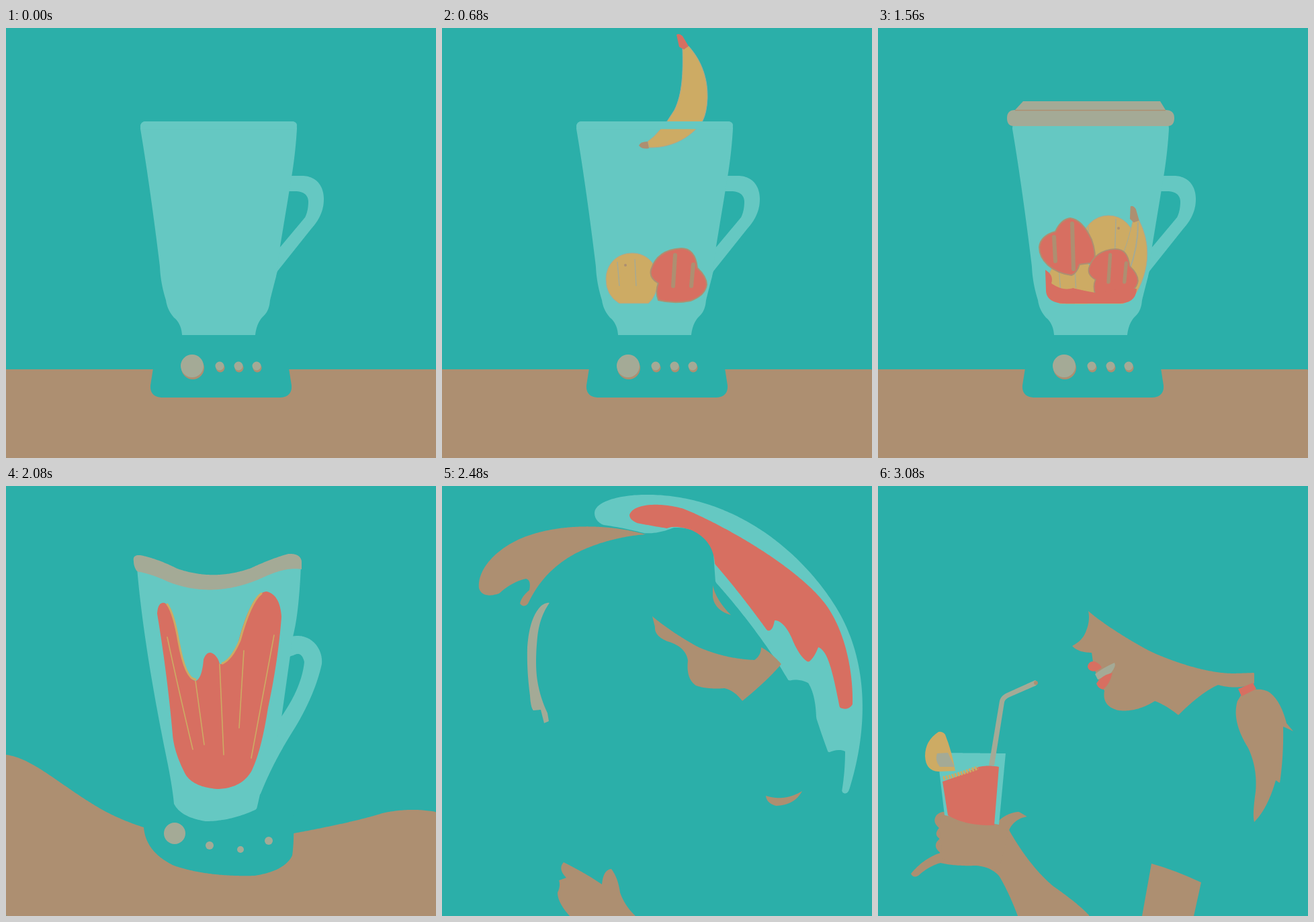
An HTML page with a canvas that plays this animation: 640x640 px, repeating every 3160 ms.

```html
<!DOCTYPE html>
<html lang="en">
<head>
<meta charset="utf-8">
<title>Smoothie</title>
<style>
html, body { margin: 0; width: 100%; height: 100%; overflow: hidden; background: #2bafa9; }
canvas { display: block; width: 640px; height: 640px; }
</style>
</head>
<body>
<canvas id="stage" width="640" height="640"></canvas>
<script>
const LOOP = 3160, STEP = 40, SAMPLES = 400, MID = 320;
const TEAL = '#2bafa9', GLASS = '#65c8c2', BROWN = '#ad8f71',
      RED = '#d76f61', YELLOW = '#cdab64', GREY = '#a4aa96';
const ctx = document.getElementById('stage').getContext('2d');

const clamp = u => Math.max(0, Math.min(1, u));
const mix = (a, b, u) => a + (b - a) * u;
const span = (t, a, b) => clamp((t - a) / (b - a));
const easeOut = u => 1 - (1 - u) * (1 - u);

// Even samples along a path, so that any two outlines can be blended
function sample(d) {
  const path = document.createElementNS('http://www.w3.org/2000/svg', 'path');
  path.setAttribute('d', d);
  const len = path.getTotalLength();
  return Array.from({ length: SAMPLES }, (_, i) => {
    const p = path.getPointAtLength(len * i / SAMPLES);
    return [p.x, p.y];
  });
}

function turned([x, y], angle) {
  const c = Math.cos(angle), s = Math.sin(angle);
  x -= MID; y -= MID;
  return [MID + x * c - y * s, MID + x * s + y * c];
}

// Each key: time, outline, degrees swirled around the centre on the way there
const track = (...keys) => keys.map(([time, d, turn = 0]) =>
  ({ time, points: sample(d), turn: turn * Math.PI / 180 }));

function pose(keys, t) {
  const last = keys.length - 1;
  if (t >= keys[last].time) return keys[last].points;
  const i = keys.findIndex(k => k.time > t);
  const a = keys[i - 1], b = keys[i];
  let u = span(t, a.time, b.time);
  if (i === last) u = easeOut(u);
  return a.points.map((p, n) => {
    const from = turned(p, b.turn * u), to = turned(b.points[n], b.turn * (u - 1));
    return [mix(from[0], to[0], u), mix(from[1], to[1], u)];
  });
}

function drawTrack(keys, color, t, end = LOOP) {
  if (t < keys[0].time || t >= end) return;
  ctx.beginPath();
  pose(keys, t).forEach(p => ctx.lineTo(p[0], p[1]));
  ctx.closePath();
  ctx.fillStyle = color;
  ctx.fill();
}

function fill(d, color) {
  ctx.fillStyle = color;
  ctx.fill(new Path2D(d));
}

function line(d, color, width = 1) {
  ctx.strokeStyle = color;
  ctx.lineWidth = width;
  ctx.stroke(new Path2D(d));
}

function dot(x, y, r, color) {
  if (r <= 0) return;
  ctx.beginPath();
  ctx.arc(x, y, r, 0, 7);
  ctx.fillStyle = color;
  ctx.fill();
}

function placed(cx, cy, dx, dy, deg, scale, draw) {
  if (scale <= 0) return;
  ctx.save();
  ctx.translate(cx + dx, cy + dy);
  ctx.rotate(deg * Math.PI / 180);
  ctx.scale(scale, scale);
  ctx.translate(-cx, -cy);
  draw();
  ctx.restore();
}

function along(keys, t) {
  const i = keys.findIndex(k => k[0] > t);
  if (i < 0) return keys[keys.length - 1].slice(1);
  if (i === 0) return keys[0].slice(1);
  const a = keys[i - 1], b = keys[i], u = span(t, a[0], b[0]);
  return a.slice(1).map((v, n) => mix(v, b[n + 1], u));
}

const JAR = 'M200 150Q200 139 208 139L425 139Q433 139 433 150Q431 185 425 222L408 325L402 370Q398 385 393 405Q392 420 384 428Q373 438 371 457L262 457Q261 440 250 431Q240 420 238 405Q230 380 229 355Q215 240 200 150Z';
const HANDLE = 'M415 220L440 220C462 220 473 235 473 255Q473 278 455 298L404 362L398 380L404 330L409 325L445 282Q450 272 450 258Q449 244 432 243L415 243Z';
const LID = 'M192 134Q192 122 204 122L216 109L420 109L428 122Q441 122 441 134Q441 146 431 146L202 146Q192 146 192 134Z';
const BASE = 'M220 500L215 532Q214 549 232 550L408 550Q426 549 425 532L420 500Z';
const TABLE_L = 'M0 508L330 508L330 640L0 640Z';
const TABLE_R = 'M320 508L640 508L640 640L320 640Z';

const jar = track([0, JAR], [1760, JAR],
  [2080, 'M195 122Q255 135 310 148Q370 130 439 118Q436 190 427 224L410 345Q400 405 379 455L373 481Q335 499 297 499Q260 493 250 473Q248 450 240 410Q205 240 195 122Z'],
  [2480, 'M227 40C227 25 260 12 310 13C430 15 528 90 583 175C632 250 638 350 606 452Q602 462 595 455Q600 425 600 395Q590 390 575 397Q565 370 557 345Q556 310 545 293Q530 286 516 290L504 270Q460 202 407 143L404 100Q390 60 345 62Q320 72 300 70Q270 62 240 58Q227 52 227 40Z', -80],
  [2880, 'M180 504L99 490L88 397L190 398Z', -174]);

const handle = track([0, HANDLE], [1760, HANDLE],
  [2080, 'M420 224L432 223C455 222 472 242 470 265Q460 310 430 360Q398 410 379 458L374 462L400 345L410 343Q440 300 444 262Q440 245 428 252L415 256Z'],
  [2400, 'M500 130L520 150L500 150Z', -60]);

const lid = track([1720, LID], [1760, LID],
  [2080, 'M190 112Q188 102 200 103Q225 108 255 123Q310 142 365 122Q395 108 420 101Q438 100 440 112L440 124Q418 120 385 135Q310 170 240 142Q220 132 195 127Q190 120 190 112Z'],
  [2480, 'M152 353L147 333L136 334Q132 330 131 312Q126 275 127 240Q130 195 148 178Q155 173 160 174Q145 195 142 225Q138 265 142 290Q146 315 157 338L159 350Z', -71],
  [2880, 'M165 416L181 320Q183 312 192 308L234 289Q239 293 235 297L196 314Q189 317 188 322L173 416Z']);

const juice = track([1280, 'M250 408L385 408L385 410L250 410Z'],
  [1560, 'M249 360Q262 368 258 380Q275 392 290 387Q310 392 330 395Q355 386 385 388Q384 409 360 410L275 410Q250 408 250 390Z'],
  [1720, 'M240 330Q265 355 290 345Q315 370 345 340Q365 350 392 300Q390 380 385 395Q380 410 360 410L270 410Q252 408 246 385Z'],
  [2080, 'M225 190Q226 172 236 174Q248 180 256 225Q266 290 283 290Q292 285 294 258Q298 247 305 248Q315 252 318 265Q328 268 345 235Q365 158 388 157Q408 162 410 195Q405 260 390 330Q380 395 365 425Q350 450 315 451Q275 448 265 425Q250 395 248 370Q240 280 225 190Z'],
  [2480, 'M279 43C284 27 320 23 360 34C430 63 543 130 577 185C602 225 612 280 611 325Q605 335 592 330C582 280 575 245 560 240Q553 258 545 262Q532 255 520 225Q508 200 495 200Q492 218 484 215Q442 157 406 116Q404 80 370 65Q345 58 335 63Q310 59 290 55Q279 50 279 43Z', -80],
  [2880, 'M173 505Q130 506 104 490L96 440Q120 432 150 418Q165 415 180 418Z', -174]);

const base = track([0, BASE], [1760, BASE],
  [2080, 'M205 490L205 508Q208 545 250 565Q300 582 370 580Q415 573 426 550Q429 530 428 490Z'],
  [2280, 'M300 600L360 600L360 640L300 640Z']);

const tableLeft = track([0, TABLE_L], [1760, TABLE_L],
  [2080, 'M0 400C40 405 80 445 140 480Q170 497 205 508L330 530L330 640L0 640Z'],
  [2480, 'M181 560Q215 577 238 593Q240 571 252 570Q262 583 265 605Q272 625 288 640L190 640Q172 620 172 605Q177 595 174 587L185 583Q172 570 181 560Z'],
  [2920, 'M87 490Q94 483 104 486Q140 507 175 503Q190 486 210 485L222 492Q203 495 195 512Q225 565 260 595Q300 623 315 640L208 640Q195 605 180 580Q165 565 145 565Q115 566 93 561Q75 566 60 580Q52 584 49 577Q68 554 93 546Q82 538 88 529L92 525Q82 519 91 509Q80 500 87 490Z']);

const tableRight = track([0, TABLE_R], [1760, TABLE_R],
  [2080, 'M320 530L428 517Q520 500 560 487Q600 478 640 485L640 640L320 640Z'],
  [2480, 'M303 72C260 75 210 90 180 112C155 130 140 150 128 175Q122 182 116 175Q118 165 130 155Q133 140 125 138Q105 142 85 160Q60 168 55 152C52 125 80 92 125 75C180 55 250 57 303 72Z', -180],
  [2880, 'M92 492Q140 507 175 503L195 514L180 572L145 564L95 555Z', -100]);

const head = track([2280, 'M400 268L420 266L422 274L402 276Z'],
  [2480, 'M313 194Q342 218 380 239Q420 257 465 259Q475 252 475 240Q490 248 505 265Q485 289 447 320Q435 304 420 301Q395 303 378 297Q363 287 366 260Q363 239 335 231Q316 223 317 210Z'],
  [2880, 'M313 186C325 197 360 222 405 246C440 262 490 279 530 279L560 278L560 294Q535 304 506 296Q480 308 447 341Q430 327 412 320Q385 337 358 334Q333 328 337 305L325 282L320 262L318 248Q298 248 289 238Q305 230 310 215Q316 200 313 186Z']);

const ponytail = track([2360, 'M512 462L512 466L506 466L506 462Z'],
  [2480, 'M536 454Q525 475 497 476Q483 472 482 461Q510 470 536 454Z'],
  [2920, 'M540 312Q560 297 581 306Q599 318 608 353L618 365L603 358Q604 400 598 442L592 438Q580 480 560 500Q557 490 562 455Q565 420 551 390Q526 350 535 320Z', -40]);

const drop = track([2360, 'M410 160L412 164L410 166Z'],
  [2480, 'M403 148Q408 170 430 192Q406 185 403 165Z'],
  [2640, 'M420 265L424 268L420 270Z']);

// Knob and buttons: x, y, radius, then where the wobble takes them
const knobs = [[277, 503, 17, 251, 517, 16], [318, 503, 6.5, 303, 535, 6],
               [346, 503, 6.5, 349, 541, 5], [373, 503, 6.5, 391, 528, 6]];

function drawKnobs(t) {
  const u = span(t, 1760, 2080), gone = span(t, 2120, 2280);
  for (const [x, y, r, x2, y2, r2] of knobs) {
    const cx = mix(x, x2, u), cy = mix(y, y2, u), size = mix(r, r2, u) * (1 - gone);
    if (u < 0.5) dot(cx + 1, cy + 3, size, BROWN);
    dot(cx, cy, size, GREY);
  }
}

function orange(flat) {
  const body = flat
    ? 'M283 335C306 335 321 353 321 374Q321 398 307 410L264 410Q244 398 244 374C244 352 260 335 283 335Z'
    : 'M244 373a39 39 0 1 0 78 0a39 39 0 1 0 -78 0Z';
  fill(body, YELLOW);
  line(body, GREY);
  line(flat ? 'M261 348L264 384M287 344L289 384' : 'M253 350L253 397M294 339L292 409', GREY, 1.4);
  dot(flat ? 273 : 298, 353, 2, BROWN);
}

function berry(body, seeds) {
  fill(body, RED);
  line(body, BROWN, 2);
  ctx.lineCap = 'round';
  line(seeds, BROWN, 6);
}

const berryA = () => berry('M356 328Q377 328 380 357Q394 370 394 382Q392 398 370 406Q345 411 322 405Q317 392 322 380Q308 372 311 360Q320 330 356 328Z',
  'M347 338L344 384M374 352L371 384');
const berryB = () => berry('M280 276Q298 278 312 308Q319 328 316 342L294 345Q290 358 282 361Q260 358 247 346Q234 334 234 319Q236 302 258 296Q266 278 280 276Z',
  'M256 304L258 340M283 284L285 352');

function banana(tip) {
  const body = 'M358 31L367 27C386 48 396 75 395 105Q394 126 388 138C374 160 345 179 308 178L306 169Q315 163 325 151Q336 139 346 122C358 98 359 65 358 31Z';
  fill(body, YELLOW);
  line(body, GREY);
  fill('M349 10Q353 7 358 12L367 27L360 32L353 28Z', tip);
  fill('M293 175Q295 169 306 169L308 179Q298 181 293 175Z', BROWN);
  if (tip === BROWN) line('M366 30Q376 65 372 105', GREY, 2);
}

// Falls under gravity from start to rest, then wobbles and melts in the blender
function fallen(t, t0, t1, cx, cy, from, settle, shrink, draw) {
  if (t < t0 || t > 1880) return;
  const u = span(t, t0, t1) ** 2, s = span(t, 1240, 1560);
  const shake = t > 1240 ? Math.sin((t - 1560) / 19) * 3 : 0;
  const melt = span(t, 1560, 1880);
  placed(cx, cy,
    from[0] * (1 - u) + settle[0] * s + shake,
    from[1] * (1 - u) + settle[1] * s + melt * 25 - Math.abs(shake),
    from[2] * (1 - u) + shake, mix(1, shrink, s) * (1 - melt), draw);
}

const bananaKeys = [[520, -8, -190, -8], [600, -4, -85, -4], [680, 0, 0, 0], [840, 24, 250, 15]];
const lidKeys = [[880, 20, -170, -26], [1000, -1, -19, -8.6], [1080, 0, 0, 0],
                 [1160, 0, -9, 3], [1240, 0, 0, 0]];

function drawFruit(t) {
  ctx.save();
  // nothing sinks below the floor of the jar
  ctx.beginPath();
  ctx.rect(0, 0, 640, 410.5);
  ctx.clip();
  fallen(t, 840, 1029, 343, 318, [4, -358, -20], [0, 0], 1,
    () => placed(283, 373, 60, -55, 0, 1, () => orange(false)));
  if (t >= 520 && t <= 1880) {
    const [dx, dy, deg] = along(bananaKeys, t), s = span(t, 1240, 1560), melt = span(t, 1560, 1880);
    placed(355, 12, dx + 2 * s - 30 * melt, dy + 7 * s + 100 * melt, deg, 1 - melt,
      () => banana(t < 760 ? RED : BROWN));
  }
  fallen(t, 80, 320, 283, 373, [-30, -415, -50], [6, 4], 0.92, () => orange(true));
  fallen(t, 760, 920, 275, 318, [40, -370, 60], [6, 7], 1, berryB);
  fallen(t, 280, 520, 352, 368, [36, -415, 70], [-2, -4], 0.88, berryA);
  ctx.restore();
}

function drawLid(t) {
  if (t < 880) return;
  if (t >= 1760) return drawTrack(lid, GREY, t);
  const [dx, dy, deg] = along(lidKeys, t);
  placed(317, 134, dx, dy, deg, 1, () => {
    fill(LID, GREY);
    line('M204 122.5L428 122.5', BROWN, 1.5);
  });
}

function drawStreaks(t) {
  if (t < 2000 || t > 2140) return;
  ctx.lineCap = 'round';
  line('M240 176Q250 190 257 232Q267 287 282 288M322 264Q336 258 348 230Q364 172 380 160', YELLOW, 3);
  line('M240 225Q256 300 278 392M282 290L295 385M318 265L324 400M354 245L347 360M399 222L365 405', YELLOW, 1.6);
}

function drawDetails(t) {
  const grow = easeOut(span(t, 2720, 2880));
  const pop = (cx, cy, draw) => placed(cx, cy, 0, 0, 0, grow, draw);
  pop(335, 282, () => {
    fill('M312 268Q314 260 322 261Q330 264 333 270Q324 278 317 275Q312 273 312 268Z', RED);
    fill('M323 280Q334 271 352 263Q355 268 347 278Q335 285 327 288Z', GREY);
    fill('M325 294Q332 282 349 278Q345 295 335 303Q328 302 325 294Z', RED);
  });
  pop(550, 303, () => fill('M536 302L558 293L563 302L541 313Z', RED));
  if (t >= 2880) {
    ctx.lineCap = 'butt';
    ctx.setLineDash([3, 1.5]);
    line('M97 435Q120 430 149 419', YELLOW, 6);
    ctx.setLineDash([]);
    dot(235, 293, 3, BROWN);
  }
  const slice = easeOut(span(t, 2800, 2960));
  placed(95, 398, 0, -60 * (1 - slice), -60 * (1 - slice), slice, () => {
    fill('M90 366Q70 379 70 402Q71 424 90 425L115 424Q110 395 100 370Q96 365 90 366Z', YELLOW);
    fill('M88 398L104 397L114 418L92 418Q84 408 88 398Z', GREY);
  });
}

function render(t) {
  ctx.fillStyle = TEAL;
  ctx.fillRect(0, 0, 640, 640);
  drawTrack(tableLeft, BROWN, t);
  drawTrack(tableRight, BROWN, t);
  drawTrack(base, TEAL, t, 2280);
  drawKnobs(t);
  if (t >= 2680) {
    placed(438, 600, 0, 90 * (1 - easeOut(span(t, 2680, 2920))), 0, 1,
      () => fill('M407 562Q440 571 481 590L470 640L393 640Z', BROWN));
  }
  drawTrack(handle, GLASS, t, 2400);
  drawTrack(jar, GLASS, t);
  drawFruit(t);
  if (t < 1240) fill('M201 150.5L432 150.5L433 144Q432 139 425 139L208 139Q200 139 200 147Z', GLASS);
  drawTrack(juice, RED, t);
  drawStreaks(t);
  drawLid(t);
  drawTrack(head, BROWN, t);
  drawTrack(ponytail, BROWN, t);
  drawTrack(drop, BROWN, t, 2640);
  drawDetails(t);
}

const start = performance.now();
function tick() {
  const t = (performance.now() - start) % LOOP;
  render(Math.floor(t / STEP) * STEP);
  requestAnimationFrame(tick);
}
tick();
</script>
</body>
</html>
```
